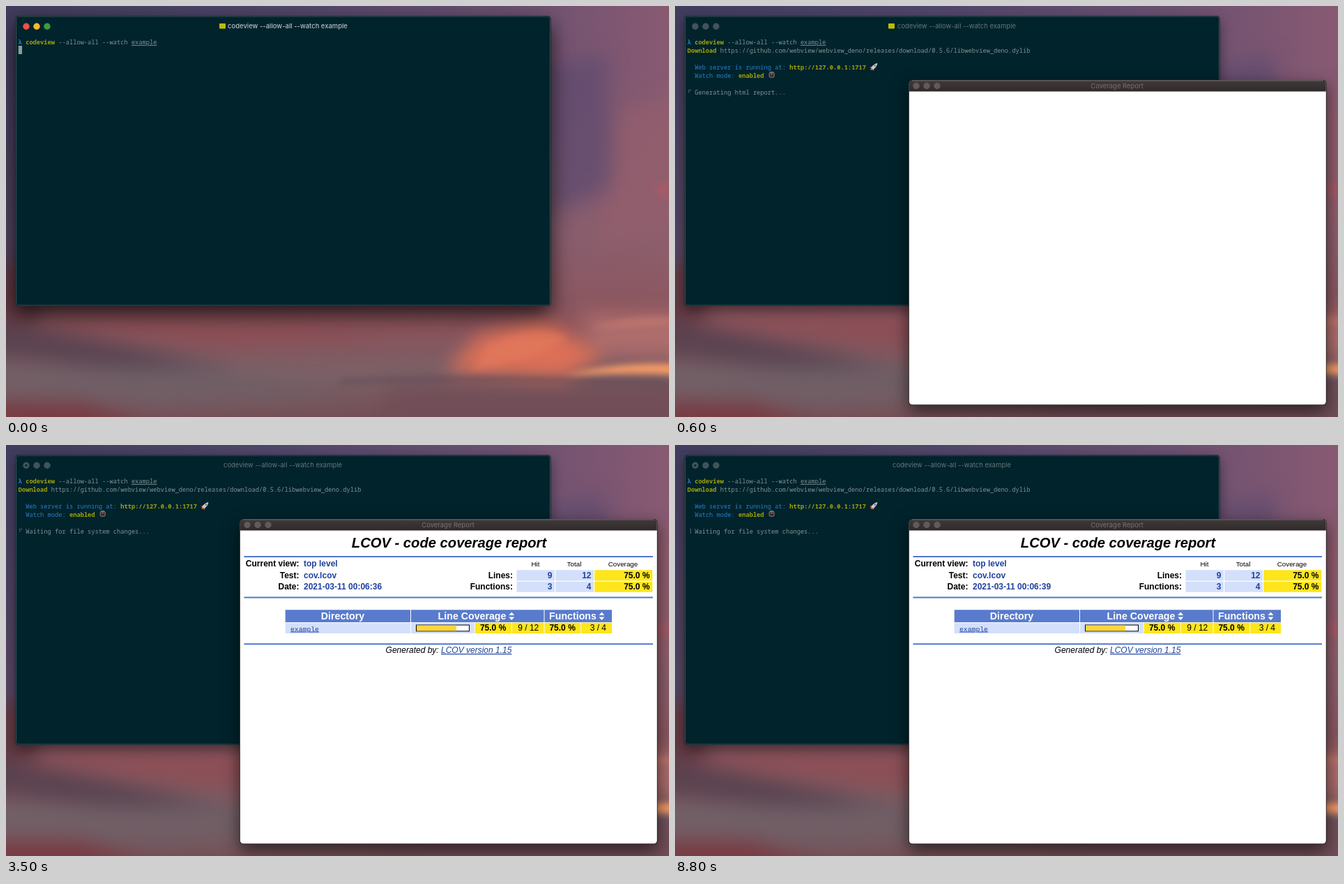
An HTML page that plays this animation: 951 px wide and 589 px high, repeating every 8900 ms.

```html
<!DOCTYPE html>
<html lang="en">
<head>
<meta charset="utf-8">
<title>Coverage report in watch mode</title>
<style>
  html, body { margin: 0; width: 100%; height: 100%; overflow: hidden; background: #5e4a60; }
  svg { display: block; width: 100vw; height: 100vh; }
  text { white-space: pre; }
  .hidden { display: none; }
  .blur { filter: blur(14px); }
  .soft { filter: blur(5px); }

  .mono { font: 8.73px "Noto Sans Mono", monospace; fill: #829093; }
  .spinner { font: 8.7px "DejaVu Sans Mono", "DejaVu Sans", monospace; fill: #829093; }
  .yellow { fill: #a0a405; }
  .blue { fill: #2b7fc8; }
  .strong { font-weight: 700; }
  .underline { text-decoration: underline; }

  .window-title { font: 500 9.45px Inter, sans-serif; text-anchor: middle; }
  #terminal .frame { filter: drop-shadow(0 7px 9px rgba(0, 0, 0, .45)); }
  #terminal.active .frame { filter: drop-shadow(0 12px 15px rgba(0, 0, 0, .75)); }
  #terminal .window-title { fill: #64777c; font-weight: 400; }
  #terminal.active .window-title { fill: #b6c0c2; font-weight: 500; }
  #terminal .lights { fill: #40545a; }
  #browser .frame { filter: drop-shadow(0 9px 12px rgba(0, 0, 0, .6)); }
  #browser .window-title { fill: #797273; font-weight: 400; }
  #browser.active .window-title { fill: #b9b3b3; }
  #browser .lights { fill: #615a5b; }
  .active .lights :nth-child(1) { fill: #e9524a; }
  .active .lights :nth-child(2) { fill: #f3ba2c; }
  .active .lights :nth-child(3) { fill: #3c9b40; }

  #report { font: 12px "Liberation Sans", Arial, sans-serif; }
  #report .bold { font-weight: 700; }
  #report .value { font-weight: 700; fill: #1f429f; }
  #report .link { fill: #1f429f; text-decoration: underline; }
  #report .right { text-anchor: end; }
  #report .center { text-anchor: middle; }
  #report .small { font-size: 9.8px; }
  #report .heading { font-weight: 700; font-size: 14.2px; fill: #fff; }
  .rule { fill: #4f78cb; }
  .head { fill: #587bcd; }
  .pale { fill: #d3dffb; }
  .medium { fill: #fee51c; }
</style>
</head>
<body>
<svg viewBox="0 0 951 589" preserveAspectRatio="none">
  <defs>
    <linearGradient id="sky">
      <stop offset="0" stop-color="#403d5e"/>
      <stop offset=".4" stop-color="#50466a"/>
      <stop offset=".75" stop-color="#6a5071"/>
      <stop offset="1" stop-color="#885a72"/>
    </linearGradient>
    <linearGradient id="dusk" x2="0" y2="1">
      <stop offset=".15" stop-color="#8f616c" stop-opacity="0"/>
      <stop offset=".55" stop-color="#8f616c" stop-opacity=".75"/>
      <stop offset=".78" stop-color="#8a535b"/>
      <stop offset=".9" stop-color="#7a6167"/>
      <stop offset="1" stop-color="#754f56"/>
    </linearGradient>
    <linearGradient id="titlebar" x2="0" y2="1">
      <stop offset="0" stop-color="#40393a"/>
      <stop offset="1" stop-color="#302a2b"/>
    </linearGradient>
    <g id="sort">
      <path d="M-4-1.3h8L0-5.8zM-4 1.3h8L0 5.8z" fill="#fff"/>
    </g>
  </defs>

  <g id="sunset">
    <path d="M0 0H951V589H0z" fill="url(#sky)"/>
    <path d="M0 0H951V589H0z" fill="url(#dusk)"/>
    <g class="blur">
      <path d="M-40 40H40V360L-40 390z" fill="#473f61" opacity=".75"/>
      <path d="M-40 370H45V450H-40z" fill="#5a333c" opacity=".8"/>
      <path d="M770 90L860 70 870 260 780 300z" fill="#5f4b70" opacity=".7"/>
      <path d="M880 150L990 120V300L850 350z" fill="#96606d" opacity=".6"/>
      <path d="M-40 440L120 475 330 520 220 525-40 500z" fill="#4c3c4b" opacity=".75"/>
      <path d="M60 445L420 450 560 475 300 490z" fill="#8e4e55" opacity=".7"/>
      <path d="M-40 520L280 515 500 560 200 575-40 550z" fill="#706067" opacity=".8"/>
      <path d="M-40 572L110 570 220 610H-40z" fill="#793a43"/>
      <path d="M630 525L680 470 770 450 860 500 800 535z" fill="#dc7057"/>
      <path d="M820 440H990V505L850 500z" fill="#ad6d6c"/>
      <path d="M560 545L980 538V620H500z" fill="#714e57" opacity=".85"/>
    </g>
    <g class="soft">
      <path d="M690 488Q750 455 805 475Q770 505 670 522z" fill="#e37b5d" opacity=".6"/>
      <path d="M800 530Q880 508 970 514V529Q890 524 800 530z" fill="#f79b67"/>
      <path d="M840 462Q900 440 970 448V456Q900 460 840 462z" fill="#c77a70" opacity=".7"/>
      <path d="M925 262L951 250V280z" fill="#ad5a67" opacity=".7"/>
      <path d="M480 535Q680 525 951 539V544Q700 535 480 541z" fill="#624654" opacity=".6"/>
    </g>
  </g>

  <g id="terminal">
    <rect class="frame" x="13.5" y="14" width="768" height="416" rx="5" fill="#071317"/>
    <rect x="14.5" y="15" width="766" height="414" rx="4.5" fill="#00232c" stroke="#49646a" stroke-width=".8"/>
    <g class="lights">
      <circle cx="29" cy="29.2" r="4.7"/><circle cx="44" cy="29.2" r="4.7"/><circle cx="59" cy="29.2" r="4.7"/>
    </g>
    <circle id="edited" cx="29" cy="29.2" r="1.5" fill="#00232c"/>
    <rect id="icon" x="306" y="25" width="9" height="7.5" rx="1" fill="#b9bc08"/>
    <text id="command-title" class="window-title" y="32.3">codeview --allow-all --watch example</text>

    <g class="mono">
      <text x="17.7" y="55"><tspan class="blue strong">λ</tspan> <tspan class="yellow strong">codeview</tspan> --allow-all --watch <tspan class="underline">example</tspan></text>
      <text id="download" x="17.7" y="67"><tspan class="yellow strong">Download</tspan> https://github.com/webview/webview_deno/releases/download/0.5.6/libwebview_deno.dylib</text>
      <g id="server">
        <text x="28.2" y="91"><tspan class="blue">Web server is running at:</tspan> <tspan class="yellow strong">http://127.0.0.1:1717</tspan></text>
        <text x="28.2" y="103"><tspan class="blue">Watch mode:</tspan> <tspan class="yellow strong">enabled</tspan></text>
        <g transform="translate(285.5 87) rotate(45)">
          <path d="M-2 1L-4 5H4L2 1z" fill="#c33a35"/>
          <path d="M0-7Q3.2-3 2 4H-2Q-3.2-3 0-7z" fill="#c3cad0"/>
          <circle cy="-2" r="1.1" fill="#40627a"/>
          <path d="M-1.2 4.5H1.2L0 7z" fill="#e79a35"/>
        </g>
        <rect x="135.2" y="95.3" width="7" height="6.8" rx="1.6" fill="#39292a" stroke="#a58d83" stroke-width=".9"/>
        <path d="M136.5 94.8h4.6M137.2 97.5h3" stroke="#b8a49a" stroke-width=".8"/>
        <text id="spinner" class="spinner" x="17.9" y="127"></text>
        <text id="status" x="28.2" y="127"></text>
      </g>
    </g>
    <rect id="cursor" x="17.8" width="5.3" height="12" fill="#8e9a9c"/>
  </g>

  <g id="browser">
    <rect class="frame" x="335" y="106" width="599.5" height="466" rx="5" fill="#171314"/>
    <rect x="335.8" y="106.7" width="598" height="464.5" rx="4.5" fill="#fff"/>
    <path d="M335.8 122.5V111q0-4.3 4.5-4.3H929.300q4.500 0 4.500 4.300V122.500z" fill="url(#titlebar)"/>
    <path d="M340 107.100H929.500" stroke="#756d6e" stroke-width=".8"/>
    <g class="lights">
      <circle cx="346" cy="114.500" r="4.700"/><circle cx="361" cy="114.500" r="4.700"/><circle cx="376" cy="114.500" r="4.700"/>
    </g>
    <text class="window-title" x="634" y="117.900">Coverage Report</text>

    <g id="report">
      <text class="bold center" x="635.500" y="147" font-style="italic" style="font-size:20.200px">LCOV - code coverage report</text>
      <path class="rule" d="M341.500 159H928v2H341.500zM341.500 217.600H928v2H341.500zM341.500 284.200H928v2H341.500z"/>

      <g class="bold right">
        <text x="420.500" y="174">Current view:</text>
        <text x="420.500" y="190.500">Test:</text>
        <text x="420.500" y="207">Date:</text>
        <text x="727" y="190.500">Lines:</text>
        <text x="727" y="207">Functions:</text>
      </g>
      <g class="value">
        <text x="427" y="174">top level</text>
        <text x="427" y="190.500">cov.lcov</text>
        <text id="date" x="427" y="207"></text>
      </g>

      <g class="small center">
        <text x="759.500" y="174">Hit</text>
        <text x="815" y="174">Total</text>
        <text x="885" y="174">Coverage</text>
      </g>
      <path class="pale" d="M732.500 179.300H787v15.300h-54.500zM788.200 179.300H843v15.300h-54.800zM732.500 195.700H787v15h-54.500zM788.200 195.700H843v15h-54.800z"/>
      <path class="medium" d="M844.200 179.300H927.200v15.300h-83zM844.200 195.700H927.200v15h-83z"/>
      <g class="value right">
        <text x="783.500" y="191">9</text><text x="839.500" y="191">12</text>
        <text x="783.500" y="207.300">3</text><text x="839.500" y="207.300">4</text>
      </g>
      <g class="bold right">
        <text x="923.500" y="191">75.0 %</text>
        <text x="923.500" y="207.300">75.0 %</text>
      </g>

      <path class="head" d="M400.700 236.200H580V254H400.700zM581 236.200H771.500V254H581zM772.500 236.200H869V254H772.500z"/>
      <g class="heading center">
        <text x="483" y="250.300">Directory</text>
        <text x="668.500" y="250.300">Line Coverage</text>
        <text x="813" y="250.300">Functions</text>
      </g>
      <use href="#sort" x="725.200" y="245.300"/>
      <use href="#sort" x="854.500" y="245.300"/>

      <path class="pale" d="M400.700 254.800H580V270H400.700zM581 254.800H671.800V270H581z"/>
      <path class="medium" d="M672.700 254.800H725V270H672.700zM725.800 254.800H771.500V270H725.800zM772.500 254.800H824.300V270H772.500zM825.200 254.800H869V270H825.200z"/>
      <text class="link" x="408" y="266.500" style="font:9.750px 'Liberation Mono',monospace">example</text>
      <rect x="588.500" y="258" width="76" height="8.800" fill="#fff" stroke="#000"/>
      <rect x="589" y="258.500" width="57" height="7.800" fill="#fdd53b"/>
      <g class="right">
        <text class="bold" x="717.300" y="266.300">75.0 %</text>
        <text x="764.300" y="266.300">9 / 12</text>
        <text class="bold" x="816.800" y="266.300">75.0 %</text>
        <text x="861" y="266.300">3 / 4</text>
      </g>
      <text class="center" x="635" y="298" font-style="italic">Generated by: <tspan class="link">LCOV version 1.15</tspan></text>
    </g>
  </g>
</svg>

<script>
const LOOP = 8900, STEP = 100;
const DOWNLOAD = 200, SERVER = 400, WINDOW = 600, FOCUS = 700, LOADED = 1000, BLUR = 2500;
const RELOADS = [3200, 6200];   // each save rebuilds the report
const REBUILD = 200;
const SPINNER = [..."⠋⠙⠹⠸⠼⠴⠦⠧⠇⠏"];

const $ = id => document.getElementById(id);
const show = (id, visible) => $(id).classList.toggle("hidden", !visible);
const activate = (id, active) => $(id).classList.toggle("active", active);

function render(time) {
  const t = Math.floor(time / STEP) * STEP;
  const loaded = t >= LOADED;
  const rebuilding = RELOADS.some(at => t >= at - REBUILD && t < at);
  const reloads = RELOADS.filter(at => t >= at).length;

  activate("terminal", t < SERVER);
  show("download", t >= DOWNLOAD);
  show("server", t >= SERVER);
  show("cursor", t < SERVER);
  $("cursor").setAttribute("y", t < DOWNLOAD ? 57 : 69);
  show("icon", !loaded);
  show("edited", loaded);
  $("command-title").setAttribute("x", loaded ? 397 : 404);

  const tick = t <= WINDOW ? 0 : t / STEP + 5;
  $("spinner").textContent = SPINNER[tick % SPINNER.length];
  $("status").textContent = loaded && !rebuilding
    ? "Waiting for file system changes..." : "Generating html report...";

  show("browser", t >= WINDOW);
  activate("browser", t >= FOCUS && t < BLUR);
  show("report", loaded);
  $("date").textContent = `2021-03-11 00:06:${33 + 3 * reloads}`;
}

function frame() {
  render(performance.now() % LOOP);
  requestAnimationFrame(frame);
}
frame();
</script>
</body>
</html>
```
